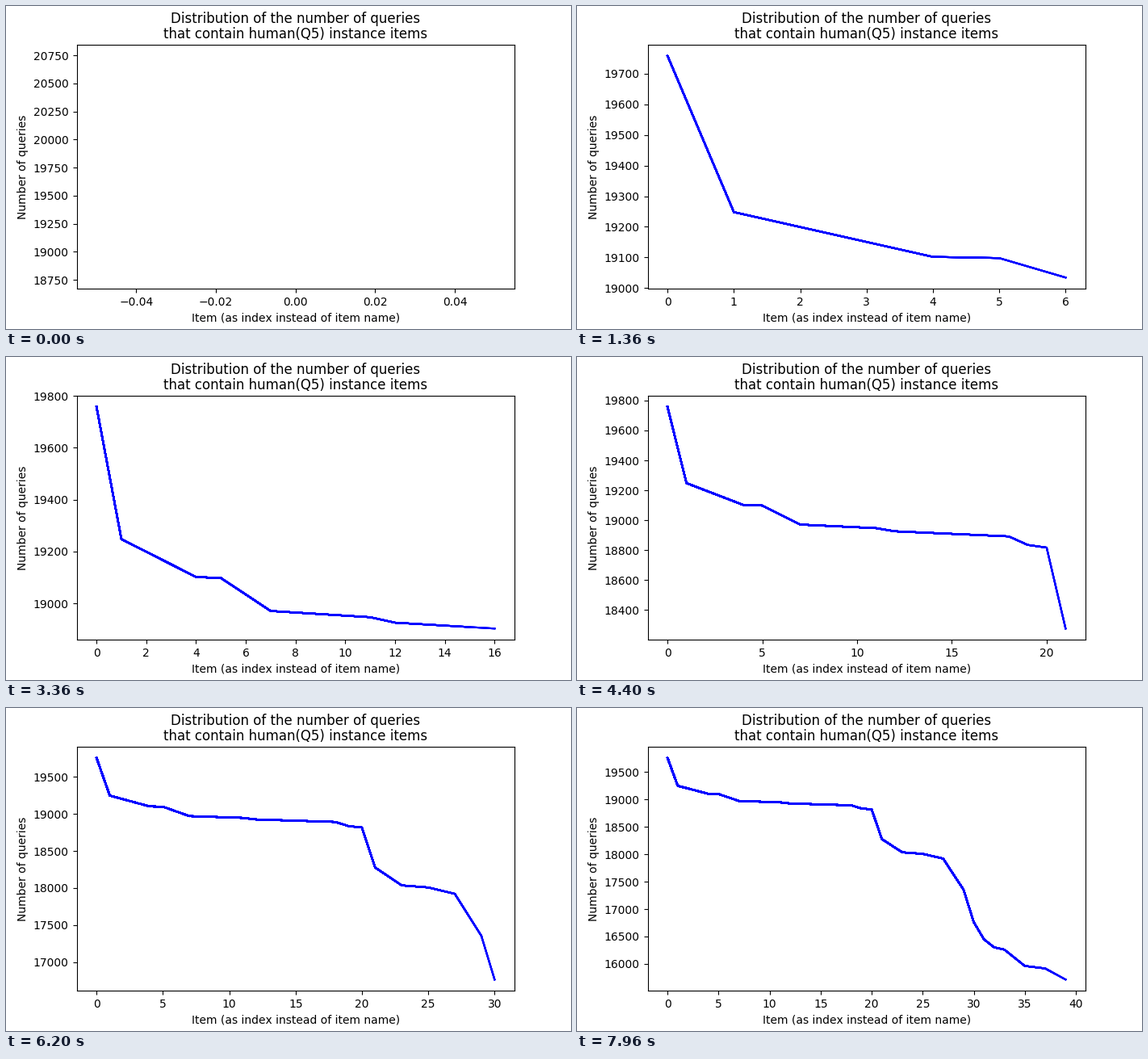
Write a matplotlib script that moves like this. It is 700 px wide and 400 px high and loops after 8000 ms.

```python
import numpy as np
import matplotlib.pyplot as plt
from matplotlib.animation import FuncAnimation
from matplotlib.collections import LineCollection

FRAMES, INTERVAL = 200, 40
MARGIN = 0.05

# Corners of the curve; the items between them lie on straight lines.
corners = {0: 19758, 1: 19248, 4: 19102, 5: 19098, 7: 18971, 11: 18947,
           12: 18926, 18: 18892, 19: 18835, 20: 18817, 21: 18276, 23: 18035,
           25: 18007, 27: 17921, 29: 17354, 30: 16763, 31: 16449, 32: 16302,
           33: 16261, 35: 15963, 37: 15917, 39: 15715}
items = np.arange(max(corners) + 1)
queries = np.interp(items, list(corners), list(corners.values()))
points = np.column_stack([items, queries])

# Running sum of 0.2: its rounding decides exactly when the next item appears.
last_item = np.cumsum([0] + [0.2] * (FRAMES - 1)).astype(int)

plt.rcParams["text.kerning_factor"] = 6
fig, ax = plt.subplots(figsize=(7, 4), dpi=100)
fig.subplots_adjust(left=0.125, right=0.9, bottom=0.125, top=0.88)
ax.set_title("Distribution of the number of queries\n"
             "that contain human(Q5) instance items", linespacing=1.08)
ax.set_xlabel("Item (as index instead of item name)")
ax.set_ylabel("Number of queries")

curves = LineCollection([], colors="blue", linewidths=1.5,
                        capstyle="projecting", joinstyle="round")
ax.add_collection(curves, autolim=False)


def padded(low, high):
    pad = MARGIN * (high - low)
    return low - pad, high + pad


def update(frame):
    last = last_item[frame]
    # Every earlier curve stays, so the overlapping strokes build up.
    curves.set_segments([points[:k + 1] for k in last_item[:frame + 1] if k])
    if last:
        ax.set_xlim(padded(0, last))
        ax.set_ylim(padded(queries[last], queries[0]))
    else:
        ax.set_xlim(padded(-0.05, 0.05))
        ax.set_ylim(padded(queries[0] * 0.95, queries[0] * 1.05))
    return [curves]


anim = FuncAnimation(fig, update, frames=FRAMES, interval=INTERVAL,
                     init_func=lambda: update(0), repeat=True, repeat_delay=0)
plt.show()
```
